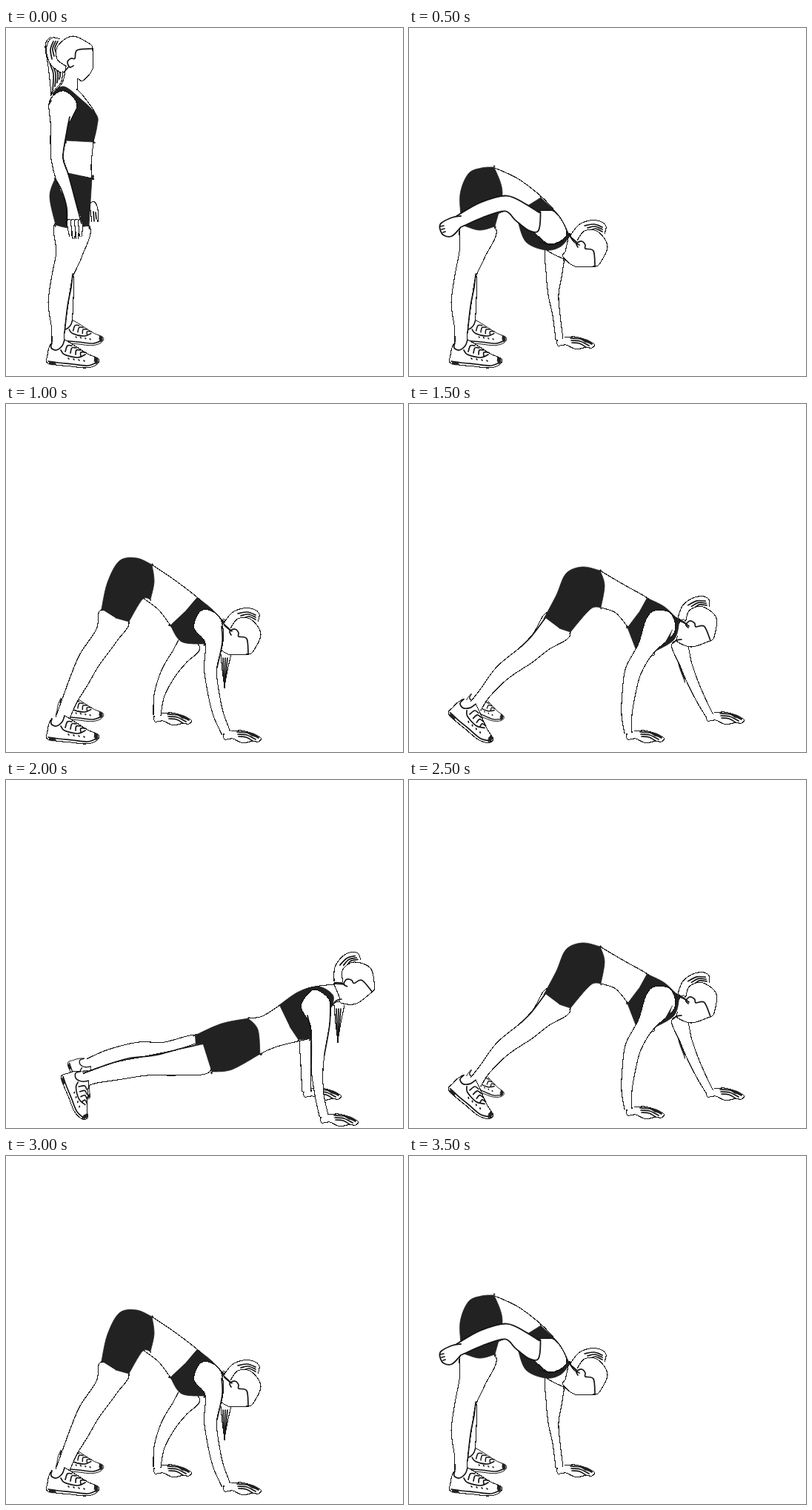
Animation, 536 px wide and 470 px high, one loop 4 s. Source, as an HTML page:

```html
<!DOCTYPE html>
<html lang="en">
<head>
<meta charset="utf-8">
<title>Walkout</title>
<style>
html, body { margin: 0; width: 100%; height: 100%; overflow: hidden; background: #fff; }
svg { display: block; width: 536px; height: 470px; }
path { stroke: #151515; stroke-linecap: round; stroke-linejoin: round; }
.skin { fill: #fff; stroke-width: 1.1; shape-rendering: crispEdges; }
.bold { fill: #fff; stroke-width: 1.8; }
.dark { fill: #222; stroke: #222; stroke-width: .8; }
.line { fill: none; stroke-width: 1.7; }
</style>
</head>
<body>
<svg id="stage" viewBox="0 0 536 470"></svg>
<script>
const points = text => text.trim().split(/\s+/).map(s => s.replace('!', '').split(',').map(Number));

// Smooth curve through points; "!" after a point makes it a corner.
function curve(text) {
  const p = points(text.replace(/(\S+)!/g, '$1 $1'));
  const at = i => p[Math.max(0, Math.min(p.length - 1, i))];
  let d = 'M' + p[0];
  for (let i = 0; i < p.length - 1; i++) {
    const [a, b, c, e] = [at(i - 1), at(i), at(i + 1), at(i + 2)];
    const c1 = b.map((v, k) => (v + (c[k] - a[k]) / 6).toFixed(1));
    const c2 = c.map((v, k) => (v - (e[k] - b[k]) / 6).toFixed(1));
    d += `C${c1} ${c2} ${c}`;
  }
  return d;
}
const make = kind => (...shapes) =>
  shapes.map(s => `<path class="${kind}" d="${curve(s)}"/>`).join('');
const [skin, bold, dark, line] = ['skin', 'bold', 'dark', 'line'].map(make);
const place = (art, how) => `<g transform="${how}">${art}</g>`;
const repeat = (n, fn) => Array.from({ length: n }, (_, i) => fn(i)).join('');

// Outline around a chain of joints "x,y,radius".
function limb(text, kind = skin) {
  const s = points(text), left = [], right = [];
  s.forEach(([x, y, r], i) => {
    const a = s[Math.max(0, i - 1)], b = s[Math.min(s.length - 1, i + 1)];
    const dx = b[0] - a[0], dy = b[1] - a[1], n = r / Math.hypot(dx, dy);
    left.unshift([x - dy * n, y + dx * n]);
    right.push([x + dy * n, y - dx * n]);
  });
  return kind([...left, ...right].join(' '));
}

// Head with its knot of hair, ear at the origin, looking right.
const headArt =
  skin('-13,14 -27,3 -33,-12 -32,-26 -25,-34 -15,-32') +
  repeat(3, i => line(`${3 * i - 26},${-5 - 4 * i} ${3 * i - 28},${-18 - i} ${3 * i - 24},-29`)) +
  skin('-6,5 -19,-5 -18,-23 2,-36 26,-25 29,-18! 29,8 16,24 9,21') +
  line('28,-19 8,-17 5,-6 0,-6 -5,-1 -2,6 3,4', '-4,6 -10,13');
const head = (x, y, turn) => place(headArt, `translate(${x} ${y}) rotate(${turn})`);
const tail = (x, y, h) =>
  skin(`${x},${y} ${x + 2},${y + h / 2} ${x + 5},${y + h}! ${x + 9},${y + h / 2} ${x + 14},${y}`) +
  repeat(3, i => line(`${x + 3 + 3 * i},${y + 5} ${x + 4 + i},${y + h * .85}`));

// Shoe, back of the heel at the origin.
const shoeArt =
  skin('6,-22 2,-14 0,-4 1,7 32,11 52,13 66,9 69,1 54,-6 32,-20 23,-25') +
  line('1,4 14,6 34,8 54,10 68,5', '6,-21 5,-14 12,-11 20,-17 23,-25', '18,-11 23,-5 40,-1 51,-5') +
  repeat(4, i => line(`${24 + 7 * i},${-9 + 2 * i} ${27 + 6 * i},${-17 + 3 * i} ${33 + 6 * i},${-17 + 3 * i}`) +
    line(`${28 + 7 * i},${i} ${29 + 7 * i},${i + 1}`)) +
  dark('2,5 10,6 10,9 2,8', '63,-2 68,1 66,8 63,3');
const shoe = (x, y, turn = 0, size = 1) =>
  place(shoeArt, `translate(${x} ${y}) rotate(${turn}) scale(${size})`);

// Flat hand, wrist at the origin.
const handArt =
  skin('-4,0 -3,8 8,7 19,12 28,12 34,10! 43,11 46,6 34,0 20,-4 6,-3') +
  repeat(3, i => line(`${14 + i},${3 * i - 2} ${28 - i},${3 * i - 1} ${43 - 4 * i},${6 + 2 * i}`)) +
  dark('25,-2 36,0 44,5 33,3');
const hand = (x, y) => place(handArt, `translate(${x} ${y})`);

const uprightLegs = hip =>
  limb('86,335,5 85,365,6 83,404,6') + shoe(69, 417, 0, .9) +
  limb(`${hip},266,23 85,306,17.5 76,335,14 70.5,372,13.5 70.5,405,9 70,428,8`) +
  line('90,332 88,350 83,376 79,412') + shoe(56, 446);

const stand =
  skin('70,19 60,13 53,24 57,52 61,88! 74,74 77,58') +
  repeat(4, i => line(`${58 + 3 * i},${24 + 5 * i} ${59 + 3 * i},46 ${64 + 3 * i},62 ${63 + 3 * i},${84 - 5 * i}`)) +
  limb('117,236,3 119,246,5 120,262,4') + line('118,248 119,261', '121,249 122,258') +
  skin('81,52 76,74 63,88! 66,130 77,175 84,197! 116,203! 115,185 118,154! 122,120 106,94 96,83! 97,68') +
  head(88, 47, 0) + uprightLegs(90) +
  dark('66,204! 59,228 67,266! 86,270 112,267! 116,203! 84,196!',
    '63,88! 78,79 100,95 122,117 123,132 118,154! 81,152! 66,100!') +
  // near arm
  limb('75,87,7 77,103,19 72,130,12 70,155,10 69,177,8 77,205,9 88,237,7 92,258,10') +
  skin('81,240 82,262! 102,264! 95,238') +
  repeat(4, i => limb(`${85 + 5 * i},260,2.6 ${86 + 5 * i},272,2.3 ${87 + 4.5 * i},${281 + 4 * Math.sin(i)},1.4`)) +
  line('86,120 82,140 77,175 84,197 95,238 102,264', '66,203 75,219 82,243 82,266', '58,103 61,98');

const bend =
  uprightLegs(95) +
  hand(204, 421) +
  limb('197,298,12 196,330,11 195,360,7 199,388,5 203,420,5') +
  skin('116,189 151,206 191,240 216,279! 209,312! 185,299 147,262 134,247 122,250!') +
  head(232, 293, 90) +
  dark('71,262! 69,225 80,197 98,189 115,188! 126,222 116,268! 95,273 72,266!',
    '162,239! 178,229! 203,254 217,281! 205,295 185,300 158,289 147,261!') +
  // arm swung back
  skin('170,248! 196,248 213,278 190,292 168,275!') +
  limb('176,262,12 168,261,14 151,249,13 131,237,10.5 100,245,10 68,261,8', bold) +
  bold('70,254 58,256 43,264 42,272 47,280 58,281 70,269') +
  repeat(3, i => line(`${42 + 2 * i},${268 + 4 * i} ${47 + i},${267 + 4 * i}`)) +
  line('216,279 223,289 230,293', '176,289 192,293 208,288');

const step =
  hand(204, 421) +
  limb('251,321,14 234,342,12 219,364,10 207,393,7 204,420,5') +
  shoe(69, 417, 0, .9) +
  limb('147,286,20 136,312,16 113,345,15 99,373,13 86,400,10 74,430,9') +
  shoe(56, 446) +
  skin('197,217 228,238 258,261 292,292! 268,320! 222,299! 206,278 185,262!') +
  dark('129,277! 137,241 153,212 176,208 197,217! 200,240 195,264! 184,264 166,294! 148,289',
    '258,261! 278,277 294,294! 268,324! 237,321 222,299! 241,281') +
  tail(290, 338, 43) + head(308, 309, 90) + line('290,291 294,297 305,307') +
  hand(298, 445) +
  limb('267,280,7 272,297,19 281,322,12 276,358,8.5 281,395,7.5 287,420,7 297,444,6') +
  line('291,300 292,322 285,356');

const reach =
  shoe(75, 407, 15, .8) +
  dark('360,326! 364,352 372,374! 372,356!') +
  hand(406, 420) +
  limb('364,322,10 374,352,8 384,378,7 396,403,6 406,421,5') +
  limb('203,296,21 178,321,15 158,339,13 126,363,11 102,391,8 90,408,9') +
  line('184,289 166,313 151,328') +
  shoe(57, 413, 34) +
  skin('258,225 290,244 322,262 367,293! 330,335! 296,302! 279,282 259,275!') +
  dark('183,288! 199,258 212,229 234,220 258,225! 264,245 259,275! 245,277 218,308! 203,303',
    '321,262! 345,274 365,293! 358,318 330,335! 307,333! 295,302! 310,282') +
  head(380, 298, 72) + line('364,290 371,295 378,300', '356,323 362,319 368,318') +
  hand(298, 445) +
  limb('343,281,11 339,300,21 320,330,12 303,360,11 297,390,9 294,420,7 296,444,5') +
  dark('355,306! 346,322! 352,317');

const plank =
  limb('262,358,14 215,368,14 180,368,14 140,376,12 112,384,8') +
  shoe(88, 380, 62, .8) +
  hand(406, 420) +
  limb('408,350,10 405,385,7 406,421,6') +
  limb('272,375,19 230,382,17 190,386,13 150,393,12 118,401,9 102,407,9') +
  line('102,397 132,386 165,376 200,372 235,363 267,356') +
  shoe(80, 398, 62, .95) +
  skin('327,322 346,319 370,304 405,282 443,276! 453,300! 441,304 411,349! 366,360 343,370!') +
  dark('255,345! 291,329 327,322! 340,337 343,370! 305,391 278,394! 266,356! 256,357!',
    '369,304! 395,286 422,279 441,290 441,304! 411,349! 395,351! 383,333') +
  tail(443, 304, 48) + head(462, 274, 54) + line('443,275 457,276', '441,304 446,298 453,296') +
  hand(429, 455) +
  limb('417,285,6 418,303,20 424,330,13 422,358,10 420,390,8 423,425,6 429,453,6') +
  line('407,318 412,345 412,395', '438,300 437,330 430,370');

const poses = [stand, bend, step, reach, plank];
const HOLD = 500;

const stage = document.getElementById('stage');
stage.innerHTML = poses.map(p => `<g visibility="hidden">${p}</g>`).join('');
const groups = [...stage.children];
const last = poses.length - 1;
const start = performance.now();

// Walk out to the last pose and back again.
function show() {
  const t = Math.max(0, performance.now() - start);
  const now = last - Math.abs(Math.floor(t / HOLD) % (2 * last) - last);
  groups.forEach((g, i) => g.setAttribute('visibility', i === now ? 'visible' : 'hidden'));
  requestAnimationFrame(show);
}
show();
</script>
</body>
</html>
```
